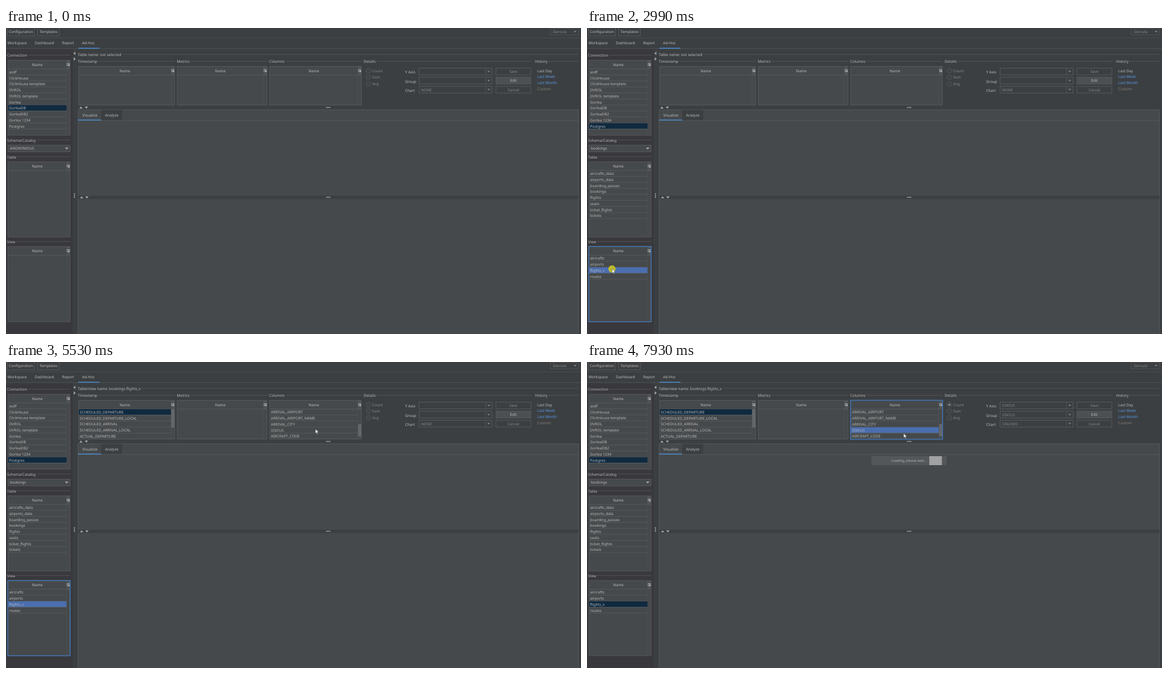
An HTML page for the animation above (8 s loop, 1025 by 546 pixels).

```html
<!DOCTYPE html>
<html lang="en">
<head>
<meta charset="utf-8">
<title>Ad-hoc table explorer</title>
<style>
html, body { margin: 0; width: 100%; height: 100%; overflow: hidden; background: #3c3f41; }
svg { display: block; width: 1025px; height: 546px; }
text { font: 6.65px "Noto Sans", "Open Sans", sans-serif; text-rendering: geometricPrecision; white-space: pre; }
</style>
</head>
<body>
<svg id="stage" viewBox="0 0 1025 546"></svg>
<script>
const LOOP = 8000, ROW = 10.73;
const INK = '#bbbbbb', DIM = '#878a8c', LINE = '#5b5e60', PANEL = '#46494b', BASE = '#3c3f41';
const BLUE = '#4a88c7', NAVY = '#0f2a40', ACTIVE = '#4b6eaf', FOCUS = '#4371a9';

// When the interface reacts
const PICK = 1490, LOADED = 1780, OPEN = 2920, SHOWN = 3060, CHOOSE = 5600, BUSY = 5640;

// ---- animation helpers ----
let css = '', count = 0;
function animate(keys, timing) {
  const all = [[0, keys[0][1]], ...keys, [LOOP, keys[keys.length - 1][1]]];
  const name = 'k' + count++;
  css += `@keyframes ${name}{${all.map(([t, v]) => `${t / LOOP * 100}%{${v}}`).join('')}}`;
  return `style="animation:${name} ${LOOP}ms ${timing} infinite"`;
}
const during = (from, to, body) =>
  `<g ${animate([[0, `opacity:${from ? 0 : 1}`], [from, 'opacity:1'], [to, `opacity:${to < LOOP ? 0 : 1}`]], 'step-end')}>${body}</g>`;
const move = (x, y = 0) => `transform:translate(${x}px,${y}px)`;

// ---- drawing helpers ----
const rect = (x, y, w, h, fill, stroke = 'none', sw = 0.8, rx = 0) =>
  `<rect x="${x}" y="${y}" width="${w}" height="${h}" rx="${rx}" fill="${fill}" stroke="${stroke}" stroke-width="${sw}"/>`;
const path = (d, fill, stroke = 'none', sw = 0.8) =>
  `<path d="${d}" fill="${fill}" stroke="${stroke}" stroke-width="${sw}"/>`;
const hline = (x1, x2, y, c = LINE) => path(`M${x1} ${y}H${x2}`, 'none', c);
const text = (x, y, s, fill = INK, anchor = 'start', extra = '') =>
  `<text x="${x}" y="${y + 2.4}" fill="${fill}" text-anchor="${anchor}" ${extra}>${s}</text>`;
const title = (x, y, s, end) => text(x, y, s, INK, 'start', `data-end="${end}"`);
const arrow = (x, y, dir, c = '#a3a6a8', r = 3) =>
  `<path d="M${-r} ${-r * 0.55}H${r}L0 ${r * 0.65}Z" fill="${c}" transform="translate(${x} ${y}) rotate(${dir})"/>`;
const dots = (x, y, dx, dy) => [-1, 0, 1].map(i =>
  `<circle cx="${x + i * dx}" cy="${y + i * dy}" r="1" fill="#b5b7b9"/>`).join('');

function table(x, y, w, h) {
  const bar = x + w - 6.3;
  return rect(x, y, w, h, PANEL, LINE) +
    rect(bar, y + 0.4, 5.9, 14.8, '#4f5355') +
    path(`M${bar} ${y}V${y + h}`, 'none', '#505355') +
    hline(x, x + w, y + 15.4) +
    text(x + (w - 6) / 2, y + 8, 'Name', INK, 'middle') +
    rect(bar + 1, y + 5.6, 4.2, 3.6, 'none', '#b0b2b4', 0.7) +
    path(`M${bar + 1} ${y + 6.2}h4.2`, 'none', '#b0b2b4') +
    path(`M${bar + 2.2} ${y + 8}h3.8l-1.9 2.6z`, '#c4c6c8');
}
const row = (x, y, w, i, s, sel) => {
  const top = y + 15.6 + i * ROW;
  return (sel ? rect(x + 0.4, top, w - 6.8, ROW - 0.5, sel) : '') +
    hline(x, x + w - 6.3, top + ROW - 0.3) + text(x + 2.2, top + 5.35, s);
};
const rows = (x, y, w, items) => items.map((s, i) => row(x, y, w, i, s)).join('');
const ring = (x, y, w, h) => rect(x - 0.2, y - 0.2, w + 0.4, h + 0.4, 'none', FOCUS, 1.7);
const combo = (x, y, w, arrowColor, split) =>
  rect(x, y, w, 12, split ? BASE : PANEL, '#606365') +
  (split ? path(`M${x + w - 11.7} ${y}v12`, 'none', LINE) : '') +
  arrow(x + w - 6, y + 6, 0, arrowColor, split ? 2.7 : 3.1);
const button = (y, s, on) =>
  rect(873.3, y, 62.4, 12, on ? '#4c5052' : BASE, '#5e6163') + text(904.5, y + 6, s, on ? INK : DIM, 'middle');

// ---- top bars ----
function header() {
  return rect(0, 0, 1025, 546, BASE) + rect(0, 37, 119, 509, '#39383c') +
    rect(2.4, -2, 48.4, 16, BASE, '#606365') + text(26.6, 7, 'Configuration', INK, 'middle') +
    rect(56.6, -2, 38.4, 16, BASE, '#606365') + text(75.8, 7, 'Templates', INK, 'middle') +
    rect(970.4, 0.6, 50, 11.6, BASE, '#55585a') + text(975, 6.5, 'Darcula', DIM) + arrow(1014.5, 6.5, 0, '#777a7c', 2.7) +
    hline(0, 1025, 17.6, '#4e5153') + hline(0, 1025, 36.8, '#555859') +
    [[2.8, 'Workspace'], [51.3, 'Dashboard'], [100, 'Report'], [135.6, 'Ad-Hoc']].map(([x, s]) => text(x, 27, s)).join('') +
    rect(129, 35.3, 37.6, 1.7, BLUE);
}

// ---- left column ----
const conn = [3.4, 57.6, 110.8, 133.6], tabs = [3.4, 238.8, 110.8, 134.2], views = [3.4, 390, 110.8, 134];
const names = ['asdf', 'ClickHouse', 'ClickHouse template', 'DVROL', 'DVROL template', 'Gorlea', 'GorleaDB',
  'GorleaDB2', 'Gorlea 1234', 'Postgres'];
const rowOf = (box, i, s, c) => row(box[0], box[1], box[2], i, s, c);
function sidebar() {
  const list = (box, items) => rows(box[0], box[1], box[2], items);
  return title(2, 49, 'Connection', 115) + table(...conn) + list(conn, names) +
    during(0, PICK, rowOf(conn, 6, names[6], NAVY)) +
    during(PICK, LOADED, rowOf(conn, 9, names[9], ACTIVE) + ring(...conn)) +
    during(LOADED, LOOP, rowOf(conn, 9, names[9], NAVY)) +
    title(2, 200.3, 'Schema/Catalog', 115) + combo(3.4, 209, 110.8, '#a3a6a8') +
    during(0, LOADED, text(7, 215, 'ANONYMOUS')) + during(LOADED, LOOP, text(7, 215, 'bookings')) +
    title(2, 230.3, 'Table', 115) + table(...tabs) +
    title(2, 381.5, 'View', 115) + table(...views) +
    during(LOADED, LOOP,
      list(tabs, ['aircrafts_data', 'airports_data', 'boarding_passes', 'bookings', 'flights', 'seats', 'ticket_flights', 'tickets']) +
      list(views, ['aircrafts', 'airports', 'flights_v', 'routes'])) +
    during(LOADED, OPEN, ring(...tabs)) +
    during(OPEN, CHOOSE, rowOf(views, 2, 'flights_v', ACTIVE) + ring(...views)) +
    during(CHOOSE, LOOP, rowOf(views, 2, 'flights_v', NAVY));
}

// ---- column pickers ----
const cols = [470, 68.6, 163.6, 69];
function pickers() {
  const stamps = ['SCHEDULED_DEPARTURE', 'SCHEDULED_DEPARTURE_LOCAL', 'SCHEDULED_ARRIVAL', 'SCHEDULED_ARRIVAL_LOCAL', 'ACTUAL_DEPARTURE'];
  const fields = ['FLIGHT_ID', 'FLIGHT_NO', 'SCHEDULED_DURATION', 'DEPARTURE_AIRPORT', 'DEPARTURE_AIRPORT_NAME', 'DEPARTURE_CITY',
    'ARRIVAL_AIRPORT', 'ARRIVAL_AIRPORT_NAME', 'ARRIVAL_CITY', 'STATUS', 'AIRCRAFT_CODE'];
  const scroll = px => animate([[0, move(0)], [4390, move(0, 3 * px)], [4790, move(0, 6 * px)]], 'step-end');
  return during(0, SHOWN, title(128, 47.5, 'Table name: not selected', 1020.5)) +
    during(SHOWN, LOOP, title(128, 47.5, 'Table/view name: bookings.flights_v', 1020.5)) +
    title(128, 60, 'Timestamp', 301) + title(304.5, 60, 'Metrics', 466) + title(469, 60, 'Columns', 634) +
    title(637.5, 60, 'Details', 937) + title(943, 60, 'History', 1020.5) +
    table(129.4, 68.6, 171, 69) + table(305.2, 68.6, 160, 69) + table(...cols) +
    during(SHOWN, LOOP,
      rows(129.4, 68.6, 171, stamps) + row(129.4, 68.6, 171, 0, stamps[0], NAVY) + rect(294.4, 84.2, 5.6, 33, '#63676a') +
      `<clipPath id="view">${rect(469.6, 84.1, 164, 53.3, '#000')}</clipPath><g clip-path="url(#view)"><g ${scroll(-ROW)}>` +
      rows(cols[0], cols[1], cols[2], fields) + during(CHOOSE, LOOP, rowOf(cols, 9, 'STATUS', ACTIVE)) + '</g></g>' +
      `<g ${scroll(4.45)}>${rect(627.6, 84.2, 5.6, 22, '#63676a')}</g>`) +
    during(CHOOSE, LOOP, ring(...cols));
}

// ---- details and history ----
function details() {
  const fieldRows = [['Y Axis', 'STATUS'], ['Group', 'STATUS'], ['Chart', 'STACKED']];
  return ['Count', 'Sum', 'Avg'].map((s, i) =>
      `<circle cx="646" cy="${76.2 + i * 11.7}" r="4.3" fill="#404345" stroke="#5a5d5f" stroke-width=".8"/>` +
      text(652.8, 76.2 + i * 11.7, s, DIM)).join('') +
    fieldRows.map(([s], i) => text(711.5, 79 + i * 16.2, s) + combo(736.3, 71.7 + i * 16.2, 130.3, '#777a7c', true)).join('') +
    during(0, BUSY, text(740, 110.3, 'NONE', DIM)) +
    during(BUSY, LOOP, fieldRows.map(([, s], i) => text(740, 77.9 + i * 16.2, s, DIM)).join('') +
      '<circle cx="646" cy="76.2" r="1.8" fill="#909395"/>') +
    button(71.7, 'Save') + button(87.9, 'Edit', true) + button(104.1, 'Cancel') +
    text(947, 76.2, 'Last Day') + text(947, 87, 'Last Week', '#5899e8') +
    text(947, 97.8, 'Last Month', '#5899e8') + text(947, 108.6, 'Custom', '#87807d');
}

// ---- chart area ----
function workspace() {
  return arrow(122, 45.3, 90) + arrow(122.3, 55.3, -90) + dots(122, 299, 0, 3) +
    arrow(133.5, 142, 180) + arrow(143.3, 142, 0) + dots(574.3, 141.8, 2.7, 0) +
    rect(128.4, 146, 892.2, 410, PANEL, '#5a5d5f') +
    rect(169.5, 146.4, 37.8, 18.2, BASE) + hline(128.4, 1020.6, 165, '#5a5d5f') +
    rect(128.4, 163.4, 41, 1.7, BLUE) + text(136, 155.5, 'Visualize') + text(176.5, 155.5, 'Analyze') +
    rect(128.8, 299.2, 891.4, 6, BASE) +
    arrow(134.8, 302.2, 180) + arrow(144.2, 302.2, 0) + dots(574.3, 302, 2.7, 0);
}

function progress() {
  const way = [[BUSY, 507], [6290, 543], [6490, 554.3], [7100, 587.5], [7710, 617.8], [7930, 610.2], [LOOP, 607.8]];
  const slide = sign => animate(way.map(([t, x]) => [t, move(sign * x)]), 'linear');
  const label = c => text(574.2, 176, 'Loading, please wait...', c, 'middle', 'style="font-size:6px"');
  return during(BUSY, LOOP, rect(507, 168, 134, 16, '#535759') + label('#b4b6b7') +
    `<clipPath id="block">${rect(0, 168, 22.5, 16, '#000')}</clipPath>` +
    `<g ${slide(1)}><g clip-path="url(#block)">${rect(0, 168, 22.5, 16, '#a0a2a3')}<g ${slide(-1)}>${label('#505456')}</g></g></g>`);
}

// ---- pointer ----
function pointer() {
  const click = (from, to, x, y) => during(from, to, `<circle cx="${x}" cy="${y}" r="6.5" fill="#bdb92f"/>`);
  const way = [[70, 978, 537], [220, 850, 455], [370, 590, 310], [520, 250, 175], [640, 70, 126], [820, 37, 162],
    [900, 37, 164], [1130, 34, 172], [1280, 33.5, 173], [1350, 33, 174], [1640, 33, 174], [1890, 89, 253.3],
    [2240, 82, 330], [2780, 44.7, 429.5], [3060, 44.7, 429.5], [3300, 220, 290], [3550, 418, 138.5], [3760, 418, 138.5],
    [3830, 430.6, 151.7], [4320, 557, 112.5], [5180, 557, 112.5], [5380, 552, 119], [5530, 551.6, 119.4],
    [5800, 551.6, 119.4], [6290, 564.5, 127.2]];
  return click(PICK, 1650, 33, 174.5) + click(OPEN, SHOWN, 44.5, 430) + click(5570, 5720, 551.6, 120) +
    during(70, LOOP, `<g ${animate(way.map(([t, x, y]) => [t, move(x, y)]), 'linear')}>` +
      path('M0 0V8L1.9 6.4L3.2 9.4L4.4 8.9L3.2 6H5.6Z', '#fff', '#26282a', 0.5) + '</g>');
}

const stage = document.getElementById('stage');
stage.innerHTML = header() + sidebar() + workspace() + pickers() + details() + progress() + pointer();

// Rule that runs on from each section title
for (const t of stage.querySelectorAll('[data-end]')) {
  const x = +t.getAttribute('x') + t.getComputedTextLength() + 1.5;
  t.insertAdjacentHTML('afterend', hline(x, t.dataset.end, t.getAttribute('y') - 2.9, '#595c5e'));
}
document.head.appendChild(document.createElement('style')).textContent = css;
</script>
</body>
</html>
```
